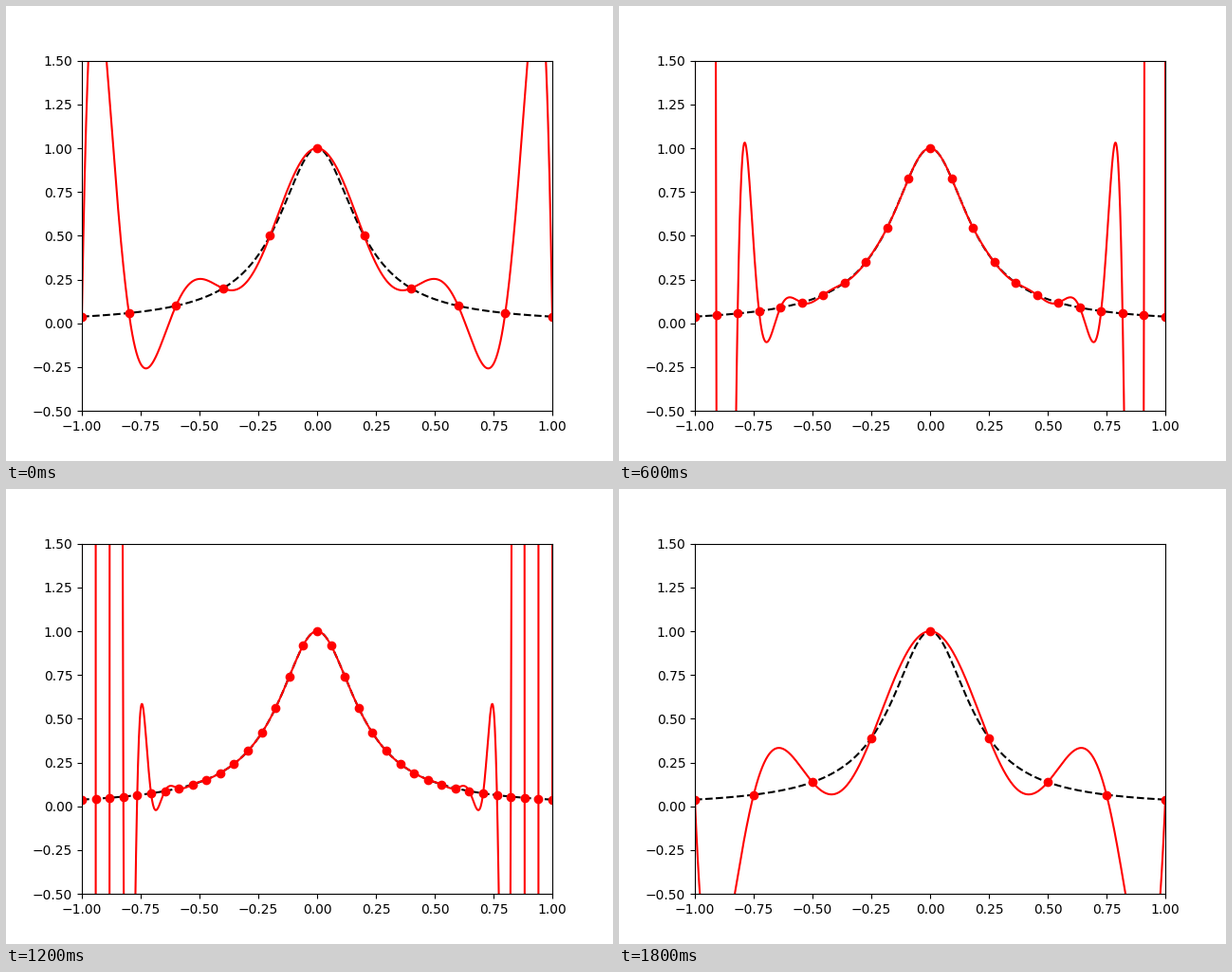
These frames come from a looping animation (640 px wide and 480 px high, 1900 ms). A matplotlib script:

```python
"""Runge's phenomenon: equispaced interpolation with a growing node count."""
from math import comb

import numpy as np
import matplotlib.pyplot as plt
from matplotlib.animation import FuncAnimation

STEPS = 19
START = 4  # the loop opens with 2 * (START + 1) + 1 nodes


def runge(x):
    return 1 / (1 + 25 * x**2)


def interpolate(nodes, values, x):
    """Barycentric interpolation; binomial weights suit equispaced nodes."""
    degree = len(nodes) - 1
    weights = np.array([(-1.0) ** j * comb(degree, j) for j in range(degree + 1)])
    diff = x[:, None] - nodes
    hit_rows, hit_cols = np.nonzero(diff == 0)
    diff[hit_rows, hit_cols] = 1
    terms = weights / diff
    y = terms @ values / terms.sum(axis=1)
    y[hit_rows] = values[hit_cols]
    return y


fig, ax = plt.subplots(figsize=(6.4, 4.8), dpi=100)
ax.set_xlim(-1, 1)
ax.set_ylim(-0.5, 1.5)

xs = np.linspace(-1, 1, 1000)
ax.plot(xs, runge(xs), "k--")
curve, = ax.plot([], [], "r-")
dots, = ax.plot([], [], "ro")


def update(frame):
    half = (frame + START) % STEPS + 1
    nodes = np.linspace(-1, 1, 2 * half + 1)
    values = runge(nodes)
    curve.set_data(xs, interpolate(nodes, values, xs))
    dots.set_data(nodes, values)
    return curve, dots


anim = FuncAnimation(fig, update, frames=STEPS, interval=100, repeat=True)
plt.show()
```
